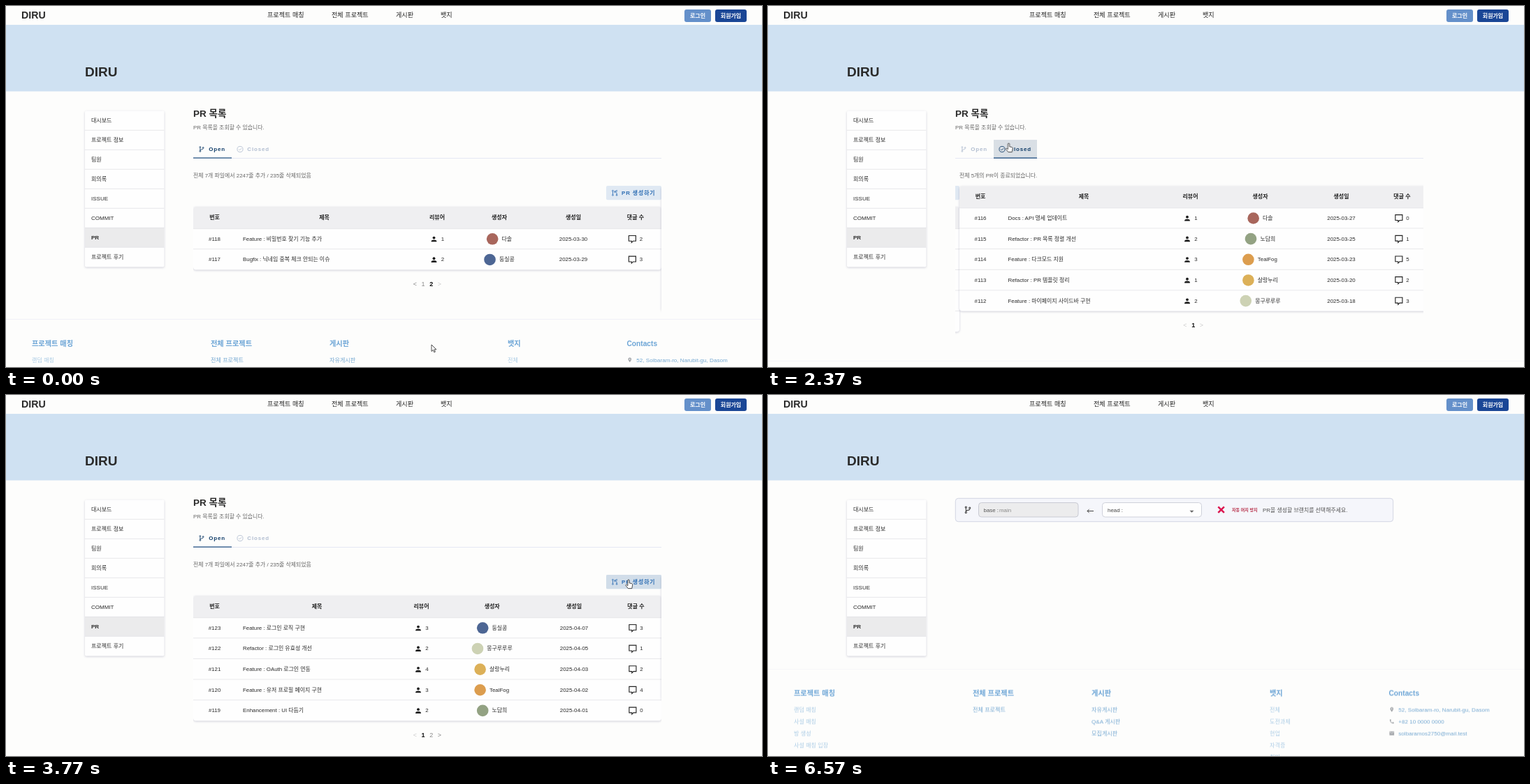
Write an HTML page that moves like this. It is 1082x518 px and loops after 6600 ms.

```html
<!DOCTYPE html>
<html lang="ko">
<head>
<meta charset="utf-8">
<title>PR 목록</title>
<style>
html, body { margin: 0; width: 100%; height: 100%; overflow: hidden; background: #fdfdfc; }
#stage { display: block; width: 100%; height: 100%; }
text { font: 7.9px "Liberation Sans", "Noto Sans CJK KR", "Noto Sans CJK", sans-serif; fill: #2b2b2b; white-space: pre; }
.mid { text-anchor: middle; }
.bold { font-weight: 700; }
.nav { font-size: 9.1px; font-weight: 500; fill: #222; }
.side { font-size: 8px; }
.btn { font-size: 8px; font-weight: 700; fill: #fff; }
.th { font-weight: 600; font-size: 8px; fill: #222; }
.dim { fill: #666; }
.page { font-size: 9px; text-anchor: middle; fill: #888; }
.page.on { font-weight: 700; fill: #111; }
.page.off { fill: #ccc; }
.tab text, .make text { font-weight: 700; letter-spacing: .9px; fill: currentColor; }
.make { color: #2f6fb4; }
.foot { font-size: 10.2px; font-weight: 700; fill: #6ca5d6; }
.link { font-size: 8.1px; fill: #76a9d2; }
.link.pale { fill: #abcce5; }
.card { fill: #fefefe; filter: drop-shadow(0 1px 1.5px rgba(40, 40, 90, .22)); }
.line { stroke: #e3e3e6; stroke-width: .8; }
.ico { fill: none; stroke: currentColor; stroke-width: 2; }
.wash { fill: #0d3a66; opacity: 0; }

#list, #create, #pg1, #pg2, #tabA, #tabB, #hand, #arrow { animation: 6.6s step-end infinite; }
#list { animation-name: list; }
#create { animation-name: create; }
#pg2 { animation-name: pg2; }
#pg1 { animation-name: pg1; }
#tabA { animation-name: tabA; }
#tabB { animation-name: tabB; }
#hand { animation-name: hand; }
#arrow { animation-name: arrow; }
@keyframes list { 0% { opacity: 1 } 64.24%, 100% { opacity: 0 } }
@keyframes create { 0% { opacity: 0 } 64.24%, 100% { opacity: 1 } }
@keyframes pg2 { 0% { opacity: 1 } 13.64%, 100% { opacity: 0 } }
@keyframes pg1 { 0% { opacity: 0 } 13.64%, 100% { opacity: 1 } }
@keyframes tabA { 0%, 47.7%, 100% { color: #0d3a66 } 31.6% { color: #b1bdd0 } }
@keyframes tabB { 0%, 47.7%, 100% { color: #b1bdd0 } 31.6% { color: #0d3a66 } }
@keyframes hand { 0%, 15%, 48.5%, 64.24%, 100% { opacity: 0 } 9.7%, 20.72%, 54.4% { opacity: 1 } }
@keyframes arrow { 0%, 15%, 48.5%, 64.24%, 100% { opacity: 1 } 9.7%, 20.72%, 54.4% { opacity: 0 } }

#slide { animation: slide 6.6s cubic-bezier(.25, .8, .5, 1) infinite; }
@keyframes slide {
  0%, 32.14%, 52.47%, 100% { transform: none }
  36.68%, 47.92% { transform: translateX(-670px) }
}
#foot { animation: foot 6.6s cubic-bezier(.25, .8, .5, 1) infinite; }
@keyframes foot {
  0%, 13.63% { transform: translateY(0) }
  13.64%, 32.14% { transform: translateY(89px) }
  36.68%, 47.92% { transform: translateY(59.3px) }
  52.47%, 64.23% { transform: translateY(89px) }
  64.24%, 100% { transform: translateY(-56.5px) }
}
#bar { transform-box: fill-box; transform-origin: 0 0; animation: bar 6.6s cubic-bezier(.4, 0, .2, 1) infinite; }
@keyframes bar {
  0%, 32.14%, 51.33%, 100% { transform: none }
  35.55%, 47.92% { transform: translateX(55px) scaleX(1.127) }
}
#overA { animation: overA 6.6s linear infinite; }
#overB { animation: overB 6.6s linear infinite; }
#overC { animation: overC 6.6s linear infinite; }
@keyframes overA { 0%, 41%, 49.7%, 100% { opacity: 0 } 42.4%, 48.4% { opacity: .07 } }
@keyframes overB { 0%, 21%, 41.4%, 100% { opacity: 0 } 22.4%, 40% { opacity: .07 } }
@keyframes overC { 0%, 54%, 100% { opacity: 0 } 55.4%, 99% { opacity: .07 } }
#ripA { animation: ripA 6.6s linear infinite; }
#ripB { animation: ripB 6.6s linear infinite; }
#ripC { animation: ripC 6.6s linear infinite; }
@keyframes ripA {
  0%, 46.3% { opacity: 0; transform: translate(31px, 14px) scale(.3) }
  46.5% { opacity: .28; transform: translate(31px, 14px) scale(.3) }
  48.5%, 49.4% { opacity: .28; transform: translate(27.5px, 13.5px) }
  52.73%, 100% { opacity: 0; transform: translate(27.5px, 13.5px) }
}
@keyframes ripB {
  0%, 30.2% { opacity: 0; transform: translate(21px, 6px) scale(.3) }
  30.3% { opacity: .28; transform: translate(21px, 6px) scale(.3) }
  32.5%, 33.8% { opacity: .28; transform: translate(31px, 13.5px) }
  36.82%, 100% { opacity: 0; transform: translate(31px, 13.5px) }
}
@keyframes ripC {
  0%, 62.2% { opacity: 0; transform: translate(32px, 8px) scale(.3) }
  62.3% { opacity: .2; transform: translate(32px, 8px) scale(.3) }
  65%, 66% { opacity: .2; transform: translate(39.5px, 10px) scale(1.25) }
  70%, 100% { opacity: 0; transform: translate(39.5px, 10px) scale(1.25) }
}
#cursor { animation: cursor 6.6s ease-in-out infinite; }
@keyframes cursor {
  0%, 3.6% { transform: translate(609px, 486px) }
  10.3%, 14.5% { transform: translate(598px, 399px) }
  20.15%, 20.72% { transform: translate(334px, 206px) }
  22.4%, 37.9% { transform: translate(344.5px, 197px) }
  43.2% { transform: translate(299px, 206px) }
  48.2% { transform: translate(299px, 206px); animation-timing-function: ease-in }
  50.45% { transform: translate(535.5px, 236px); animation-timing-function: ease-out }
  54.5%, 79.5% { transform: translate(891px, 265px) }
  84.85%, 100% { transform: translate(880px, -20px) }
}
</style>
</head>
<body>
<svg id="stage" viewBox="0 0 1082 518">
  <defs>
    <g id="branch" class="ico">
      <circle cx="7" cy="5" r="2"/><circle cx="7" cy="19" r="2"/><circle cx="17" cy="7" r="2"/>
      <path d="M7 7V17C7 14 9 13 12 13C15 13 17 12 17 9"/>
    </g>
    <g id="check" class="ico"><circle cx="12" cy="12" r="9.5"/><path d="M7.5 12.2L10.7 15.4L17 9"/></g>
    <g id="pull" class="ico">
      <circle cx="5" cy="5" r="2"/><circle cx="5" cy="19" r="2"/><circle cx="18" cy="19" r="2"/>
      <path d="M5 7V17M18 17V12L11 7M11 12V6H17M18 2V8"/>
    </g>
    <g id="person"><circle cx="12" cy="8" r="4"/><path d="M12 14C7.6 14 4 15.8 4 18V20H20V18C20 15.8 16.4 14 12 14Z"/></g>
    <path id="note" class="ico" d="M3 3H21V17H14L10 21V17H3Z"/>
    <path id="pin" d="M12 2A7 7 0 0 0 5 9C5 14 12 22 12 22S19 14 19 9A7 7 0 0 0 12 2ZM12 6.5A2.5 2.5 0 1 1 12 11.5A2.5 2.5 0 0 1 12 6.5Z"/>
    <path id="phone" d="M4 3H8L9.5 8L7 10.5Q9.5 15 13.5 17L16 14.5L21 16V20Q20 21 19 21Q4 20 3 4Z"/>
    <path id="mail" d="M2 4H22V20H2ZM4 6V8L12 13L20 8V6L12 11Z"/>
  </defs>
  <rect width="1082" height="518" fill="#fdfdfc"/>
  <g id="foot"></g>
  <g id="frame"></g>
  <g id="list"></g>
  <g id="create"></g>
  <g id="cursor" stroke="#222" stroke-width=".8" stroke-linejoin="round" fill="#fff">
    <path id="arrow" d="M0 0V9.6L2.3 7.5L3.8 10.9L5.4 10.2L3.9 6.9H6.9Z"/>
    <path id="hand" d="M-1.1 1C-1.1 -.4 1.1 -.4 1.1 1V4.8L4.5 5.6C5.6 5.9 5.8 6.8 5.6 7.8L4.8 12.6H-.6L-4 8.4C-4.2 7.3 -3.2 6.9 -2.3 7.6L-1.1 8.7Z"/>
  </g>
</svg>
<script>
const $ = id => document.getElementById(id);
const text = (x, y, s, cls = '', fill = '') =>
  `<text x="${x}" y="${y}" dy=".355em" class="${cls}"${fill && ` style="fill:${fill}"`}>${s}</text>`;
const box = (x, y, w, h, fill, r = 0, more = '') =>
  `<rect x="${x}" y="${y}" width="${w}" height="${h}" rx="${r}" fill="${fill}" ${more}/>`;
const rule = (x, y, w) => `<path class="line" d="M${x} ${y}h${w}"/>`;
const icon = (id, cx, cy, size, color = 'currentColor') =>
  `<use href="#${id}" style="color:${color}" fill="${color}" transform="translate(${cx - size / 2} ${cy - size / 2}) scale(${size / 24})"/>`;

const BRAND = 'DIRU';
const ROW = 29.65;

// name: [avatar colour, name width]
const people = {
  '다솔': ['#a8665c', 14.5],
  '둥실콩': ['#4d6694', 21.8],
  '몽구루루루': ['#cdd2b4', 36.3],
  '살랑누리': ['#dcb058', 29],
  'TealFog': ['#dc9d4e', 29],
  '노담희': ['#93a283', 21.8],
};

function table(top, cols, titleX, rows) {
  const [no, title, rev, who, date, talk] = cols;
  const h = 31.6 + rows.length * ROW - .4;
  const heads = ['번호', '제목', '리뷰어', '생성자', '생성일', '댓글 수'];
  let out = box(268, top, 670, h, '#fefefe', 4, 'class="card"') +
    `<path fill="#efeff1" d="M268 ${top + 31.6}V${top + 4}q0-4 4-4H934q4 0 4 4V${top + 31.6}Z"/>` +
    heads.map((s, i) => text(cols[i], top + 15, s, 'th mid')).join('') + rule(268, top + 31.6, 670);
  rows.forEach(([id, name, n, author, day, c], i) => {
    const y = top + 46 + i * ROW, [color, w] = people[author], left = who - (w + 22) / 2;
    out += text(no, y, '#' + id, 'mid') + text(titleX, y, name) +
      icon('person', rev - 4.5, y + .5, 11.6, '#1d1d1d') + text(rev + 5.8, y, n) +
      `<circle cx="${left + 8.4}" cy="${y + .3}" r="8.3" fill="${color}"/>` + text(left + 21.8, y, author) +
      text(date, y, '2025-' + day, 'mid') +
      icon('note', talk - 4.6, y + .5, 13.4, '#222') + text(talk + 5.7, y, c);
    if (i) out += rule(268, y - 14.9, 670);
  });
  return out;
}

const pager = (x, y, marks) => marks.map(([s, cls], i) => text(x + i * 11.7, y, s, 'page ' + cls)).join('');

// header, hero and side menu
const menu = ['대시보드', '프로젝트 정보', '팀원', '회의록', 'ISSUE', 'COMMIT', 'PR', '프로젝트 후기'];
$('frame').innerHTML =
  box(0, 27, 1082, 95.5, '#cfe1f2') + text(22, 13, BRAND, 'bold" font-size="14.3') +
  [[374, '프로젝트 매칭'], [466, '전체 프로젝트'], [558, '게시판'], [622, '뱃지']].map(([x, s]) => text(x, 12.7, s, 'nav')).join('') +
  box(971, 5, 38, 18, '#6490ca', 3) + text(990, 13.8, '로그인', 'btn mid') +
  box(1015, 5, 45, 18, '#1a4696', 3) + text(1037.5, 13.8, '회원가입', 'btn mid') +
  text(113, 94.5, BRAND, 'bold') +
  box(113, 150.5, 113.5, 224, '#fefefe', 2, 'class="card"') + box(113, 318, 113.5, 28, '#ebebec') +
  menu.map((s, i) => (i ? rule(113, 150.3 + i * 28, 113.5) : '') + text(122, 164 + i * 28, s, 'side' + (s == 'PR' ? ' bold' : ''))).join('');
const [logo, hero] = [...$('frame').querySelectorAll('text')].filter(e => e.textContent == BRAND);
logo.style.fontSize = '14.2px';
hero.style.fontSize = '19px';

// list view
const open = [
  ['123', 'Feature : 로그인 로직 구현', 3, '둥실콩', '04-07', 3],
  ['122', 'Refactor : 로그인 유효성 개선', 2, '몽구루루루', '04-05', 1],
  ['121', 'Feature : OAuth 로그인 연동', 4, '살랑누리', '04-03', 2],
  ['120', 'Feature : 유저 프로필 페이지 구현', 3, 'TealFog', '04-02', 4],
  ['119', 'Enhancement : UI 다듬기', 2, '노담희', '04-01', 0],
];
const older = [
  ['118', 'Feature : 비밀번호 찾기 기능 추가', 1, '다솔', '03-30', 2],
  ['117', 'Bugfix : 닉네임 중복 체크 안되는 이슈', 2, '둥실콩', '03-29', 3],
];
const closed = [
  ['116', 'Docs : API 명세 업데이트', 1, '다솔', '03-27', 0],
  ['115', 'Refactor : PR 목록 정렬 개선', 2, '노담희', '03-25', 1],
  ['114', 'Feature : 다크모드 지원', 3, 'TealFog', '03-23', 5],
  ['113', 'Refactor : PR 템플릿 정리', 1, '살랑누리', '03-20', 2],
  ['112', 'Feature : 마이페이지 사이드바 구현', 2, '몽구루루루', '03-18', 3],
];
const press = (key, x, y, w, h, r) =>
  `<svg x="${x}" y="${y}" width="${w}" height="${h}"><rect id="over${key}" class="wash" width="${w}" height="${h}"/>` +
  `<circle id="rip${key}" class="wash" r="${r}"/></svg>`;
const tab = (key, x, w, id, s) =>
  `<g class="tab" id="tab${key}">${press(key, x, 192, w, 27, 34)}${icon(id, x + 12, 205.5, 10.2)}${text(x + 22.3, 205.5, s)}</g>`;

$('list').innerHTML =
  text(268, 154.7, 'PR 목록', 'bold title') + text(268, 174.4, 'PR 목록을 조회할 수 있습니다.', 'dim') +
  box(268, 218.1, 670, .8, '#dfe2f2') +
  tab('A', 268, 55, 'branch', 'Open') + tab('B', 323, 62, 'check', 'Closed') +
  box(268, 217.4, 55, 1.2, '#1d4c7d', 0, 'id="bar"') +
  `<svg x="268" y="225" width="670" height="293" viewBox="268 225 670 293"><g id="slide">
    ${text(268, 243, '전체 7개 파일에서 2247줄 추가 / 235줄 삭제되었음', 'dim')}
    <g class="make">${box(859, 258, 79, 20.3, '#e0e9f3', 2)}${press('C', 859, 258, 79, 20.3, 34)}
      ${icon('pull', 871.5, 268.3, 10.4)}${text(881, 268.4, 'PR 생성하기')}</g>
    <g id="pg2">${table(288, [298.5, 455.5, 617, 706, 812, 901], 339, older)}
      ${pager(585.3, 398.5, [['&lt;', ''], ['1', ''], ['2', 'on'], ['&gt;', 'off']])}</g>
    <g id="pg1">${table(288, [298.5, 445, 594.5, 695.7, 813, 901.5], 339, open)}
      ${pager(585.3, 487.5, [['&lt;', 'off'], ['1', 'on'], ['2', ''], ['&gt;', '']])}</g>
    <g transform="translate(670 0)">${text(268, 243, '전체 5개의 PR이 종료되었습니다.', 'dim')}
      ${table(258.2, [298, 446, 598.5, 698.5, 814.5, 901.5], 337.5, closed)}
      ${pager(591, 457.8, [['&lt;', 'off'], ['1', 'on'], ['&gt;', 'off']])}</g>
  </g></svg>`;
$('list').querySelector('.title').style.fontSize = '13.5px';

// branch picker view
$('create').innerHTML =
  box(268.3, 148.3, 626.4, 33.4, '#f5f6fb', 4, 'stroke="#c8ccdc" stroke-width=".8"') +
  icon('branch', 286, 164.8, 13, '#444') +
  box(301.5, 154.5, 142.5, 20.5, '#ececed', 4, 'stroke="#bfc1cc" stroke-width=".8"') +
  text(308.5, 165, 'base :', '', '#555') + text(331, 165, 'main', '', '#888') +
  '<path d="M466 166.5H457M459.7 163.8L457 166.5L459.7 169.2" fill="none" stroke="#444"/>' +
  box(478.5, 154.5, 142, 20.5, '#fefefe', 4, 'stroke="#c5c7d2" stroke-width=".8"') +
  text(486, 165, 'head :', '', '#444') +
  '<path d="M603.5 165.8h6l-3 3Z" fill="#666"/>' +
  '<path d="M644.3 160.3l8.6 8.6m0-8.6l-8.6 8.6" stroke="#dc1650" stroke-width="2.5"/>' +
  text(664, 164.5, '자동 머지 방지', 'bold warn', '#b8324c') +
  text(708, 165, 'PR을 생성할 브랜치를 선택해주세요.', '', '#555');
$('create').querySelector('.warn').style.fontSize = '6px';

// footer
const columns = [
  [37, '프로젝트 매칭', 'pale', ['랜덤 매칭', '사설 매칭', '방 생성', '사설 매칭 입장']],
  [293, '전체 프로젝트', '', ['전체 프로젝트']],
  [463, '게시판', '', ['자유게시판', 'Q&amp;A 게시판', '모집게시판']],
  [718, '뱃지', 'pale', ['전체', '도전과제', '현업', '자격증', '취미']],
];
const contacts = [
  ['pin', '52, Solbaram-ro, Narubit-gu, Dasom'],
  ['phone', '+82 10 0000 0000'],
  ['mail', 'solbaramos2750@mail.test'],
];
const itemY = i => 507.8 + i * 17.1;
$('foot').innerHTML = box(0, 449, 1082, .8, '#ededf5') +
  columns.map(([x, head, cls, items]) => text(x, 484, head, 'foot') +
    items.map((s, i) => text(x, itemY(i), s, 'link ' + cls)).join('')).join('') +
  text(888.5, 484, 'Contacts', 'foot') +
  contacts.map(([id, s], i) => icon(id, 892.8, itemY(i), 8, '#a3a6aa') + text(902.3, itemY(i), s, 'link')).join('');
</script>
</body>
</html>
```
